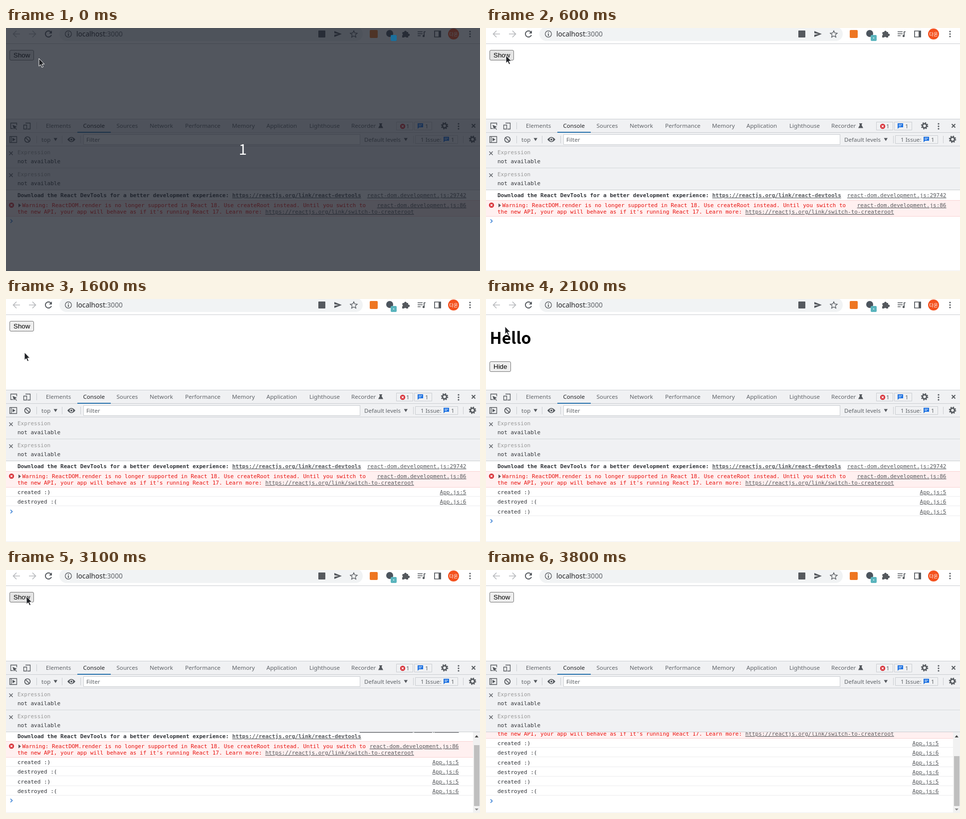
These frames come from a looping animation (950 px wide and 487 px high, 4100 ms). An HTML page:

```html
<!DOCTYPE html>
<html lang="en">
<meta charset="utf-8">
<title>Mount and unmount demo</title>
<style>
  html, body { margin: 0; width: 100%; height: 100%; overflow: hidden; background: #fff; }
  svg { display: block; width: 950px; height: 487px; }
  text { white-space: pre; }
  .ui { font: 11.6px "Noto Sans", sans-serif; fill: #5f6368; }
  .mono { font: 11px "DejaVu Sans Mono", monospace; fill: #303338; }
  .link { text-decoration: underline; fill: #55585c; }
  .end { text-anchor: end; }
  .red { fill: #e8120e; }
  .bold { font-weight: bold; }
  .dark { fill: #202124; }
  .icon { fill: none; stroke: #55595e; stroke-width: 1.7; }
  .solid { fill: #55595e; }
  .thin { stroke-width: 1.3; }
  .rule { stroke: #cacdd1; fill: none; }
  .cjk { font-family: "Noto Sans CJK KR", "Noto Sans CJK JP", "Noto Sans CJK", sans-serif; }
</style>
<svg viewBox="0 0 950 487">
  <defs>
    <g id="gear" class="icon">
      <circle r="4.1" stroke-width="2.8"/>
      <circle r="6.2" stroke-width="2.2" stroke-dasharray="2.435"/>
    </g>
    <g id="bubble">
      <path d="M0 0H11V8H3L0 11Z" fill="#1a6fe0"/>
      <path d="M2 2.8H9M2 5.3H7" stroke="#fff"/>
    </g>
    <g id="dots" class="solid"><circle cy="-5" r="1.6"/><circle r="1.6"/><circle cy="5" r="1.6"/></g>
    <path id="cross" d="M-3.5-3.5L3.5 3.5M3.5-3.5L-3.5 3.5"/>
    <g id="error">
      <circle r="5.2" fill="#d8343b"/>
      <path d="M-2-2L2 2M2-2L-2 2" stroke="#fff" stroke-width="1.3"/>
    </g>
    <clipPath id="list"><rect y="324" width="950" height="163"/></clipPath>
  </defs>

  <!-- Browser bar -->
  <rect x="107" y="-2" width="608" height="28" rx="14" fill="#f1f3f4"/>
  <path class="rule" d="M0 31.5H950" stroke="#dadce0"/>
  <g class="icon">
    <path d="M28 12H15M21 5.5L14.5 12L21 18.5M46 12H59M53 5.5L59.5 12L53 18.5" stroke="#b9bbbe"/>
    <path d="M90 8A6.2 6.2 0 1 0 91 14" stroke-width="2"/>
    <circle cx="125" cy="12" r="6.3" class="thin"/>
    <path d="M125 11V16M125 8V9.6"/>
    <path d="M697 5.5L699 10L704 10.5L700.2 13.8L701.3 18.5L697 16L692.7 18.5L693.8 13.8L690 10.5L695 10Z" class="thin"/>
    <path d="M825 7.5H835M825 11.5H835M825 15.5H831M838 16V7.5H841"/>
    <path d="M859 6H871V18H859Z"/>
  </g>
  <g class="solid">
    <path d="M92 5V11H86Z"/>
    <rect x="626" y="5" width="14" height="14" rx="1"/>
    <path d="M658 6L673 12L658 18V13.5L667 12L658 10.5Z"/>
    <path d="M795 8H798A2.4 2.4 0 1 1 803 8H806V11.5A2.4 2.4 0 1 1 806 16V19H802A2.2 2.2 0 0 0 798 19H794V15A2.2 2.2 0 0 0 794 11Z"/>
    <circle cx="837" cy="16" r="2.2"/>
    <path d="M867 6H872V18H867Z"/>
  </g>
  <rect x="729" y="4" width="16" height="16" rx="2" fill="#ee7623"/>
  <circle cx="769" cy="11" r="7" fill="#4c555e"/>
  <rect x="771" y="14" width="12" height="12" rx="2" fill="#5ab4bd"/>
  <circle cx="777" cy="20" r="1" fill="#fff"/>
  <circle cx="897" cy="12" r="11" fill="#f4511e"/>
  <text class="cjk" x="897" y="15.5" font-size="9.5" text-anchor="middle" fill="#fff">다온</text>
  <use href="#dots" x="930" y="12"/>
  <text class="ui dark" x="141" y="17" style="font-size:13.7px">localhost<tspan fill="#5f6368">:3000</tspan></text>

  <!-- Page -->
  <text id="hello" class="cjk" x="7.5" y="90" font-size="32" font-weight="bold">Hello</text>
  <g id="button">
    <rect id="face" x="7.5" y=".5" height="20" rx="2.5" stroke="#767676"/>
    <text id="label" x="15" y="15" font-family="Liberation Sans, Arial, sans-serif" font-size="13.33"></text>
  </g>

  <!-- Panel tabs and toolbar -->
  <rect y="182" width="950" height="142" fill="#f0f1f3"/>
  <path class="rule" d="M0 182.5H950M0 209.5H950M0 236.5H950M61.5 189V203M61.5 216V231M112.5 216V231M149.5 216V231M816.5 216V231M916.5 216V231"/>
  <path class="rule" d="M0 280.5H950" stroke-opacity=".7"/>
  <path d="M143 209H210" stroke="#2a73ad" stroke-width="2"/>
  <g class="icon thin">
    <path d="M14 201.5H9.5V190.5H21.5V195"/>
    <path d="M39 190.5H48.5V202.5H43M35.5 194.5H41.5V202.5H35.5Z"/>
    <path d="M7.5 217.5H21.5V229.5H7.5ZM10.5 218V229"/>
    <circle cx="43" cy="223.5" r="5.5" stroke-width="1.7"/>
    <path d="M39 219.5L47 227.5" stroke-width="1.7"/>
    <use href="#cross" x="937" y="196" stroke-width="1.8"/>
    <use href="#cross" x="10" y="251"/>
    <use href="#cross" x="10" y="295"/>
  </g>
  <g class="solid">
    <path d="M13 194L22 198L18.5 199.5L22 203L21 204L17.5 200.5L16 203.5Z"/>
    <path d="M13 220L19 223.5L13 227Z"/>
    <path d="M748 191H754V192.5H753V195L756 200.5H746L749 195V192.5H748Z"/>
    <path d="M95.500 220.500H103L99.250 226.500ZM797.500 220.500H805L801.250 226.500Z"/>
    <path d="M123 223.500Q131 213.500 139 223.500Q131 233.500 123 223.500Z"/>
  </g>
  <circle cx="131" cy="223.5" r="2.7" fill="#55595e" stroke="#f0f1f3" stroke-width="1.5"/>
  <rect class="rule" x="155.500" y="213.500" width="554" height="20" style="fill:#fff"/>
  <path class="rule" d="M782.5 188.500H815.5V204.500H782.5ZM818.500 188.500H853.500V204.500H818.500ZM820.500 215.500H905.500V231.500H820.500Z"/>
  <use href="#error" x="795" y="197"/>
  <use href="#bubble" x="825" y="191"/>
  <use href="#bubble" x="877" y="218"/>
  <use href="#gear" x="879" y="196"/>
  <use href="#gear" x="935" y="223"/>
  <use href="#dots" x="907" y="197"/>
  <g class="ui">
    <text x="80" y="200">Elements</text>
    <text x="154.500" y="200" class="dark">Console</text>
    <text x="221.500" y="200">Sources</text>
    <text x="288" y="200">Network</text>
    <text x="359" y="200">Performance</text>
    <text x="453" y="200">Memory</text>
    <text x="522" y="200">Application</text>
    <text x="608" y="200">Lighthouse</text>
    <text x="692" y="200">Recorder</text>
    <text x="802" y="201">1</text>
    <text x="840" y="201">1</text>
    <text x="71" y="228">top</text>
    <text x="161" y="228">Filter</text>
    <text x="718" y="228">Default levels</text>
    <text x="831" y="228">1 Issue:</text>
    <text x="892" y="228">1</text>
  </g>
  <g class="mono">
    <text x="23" y="253" fill="#999">Expression</text>
    <text x="23" y="271">not available</text>
    <text x="23" y="297" fill="#999">Expression</text>
    <text x="23" y="315">not available</text>
  </g>

  <!-- Console messages -->
  <g clip-path="url(#list)">
    <g id="messages" class="mono">
      <text x="23" y="339" class="bold">Download the React DevTools for a better development experience: <tspan class="link">https://reactjs.org/link/react-devtools</tspan></text>
      <text id="first" class="link end source" y="339">react-dom.development.js:29742</text>
      <rect y="345" width="950" height="32" fill="#fff0f0"/>
      <path d="M0 345.500H950M0 377.500H950" stroke="#f8d3d3"/>
      <use href="#error" x="11" y="355"/>
      <path class="solid" d="M25 351.500L30 355.500L25 359.500Z"/>
      <text x="32.500" y="359" class="red">Warning: ReactDOM.render is no longer supported in React 18. Use createRoot instead. Until you switch to</text>
      <text x="23" y="372" class="red">the new API, your app will behave as if it's running React 17. Learn more: <tspan class="link">https://reactjs.org/link/switch-to-createroot</tspan></text>
      <text class="link end source" y="359">react-dom.development.js:86</text>
      <g id="logs"></g>
      <path id="prompt" d="M9 -3.500L12.500 0L9 3.500" fill="none" stroke="#3b82d6" stroke-width="1.700"/>
    </g>
  </g>
  <path d="M0 486.500H950" stroke="#eeeff0"/>
  <path class="rule" d="M0 324.500H950"/>
  <g id="scrollbar">
    <rect x="936" y="325" width="14" height="162" fill="#f1f1f1"/>
    <path d="M939.500 335.500H947L943.250 331Z" fill="#404040"/>
    <path d="M939.500 478H947L943.250 482Z" fill="#8c8c8c"/>
    <rect id="thumb" x="938" width="11" fill="#bfbfbf"/>
  </g>

  <!-- Countdown -->
  <g id="countdown">
    <rect width="950" height="487" fill="#181e28" fill-opacity=".75"/>
    <rect x="771" y="14" width="12" height="12" rx="2" fill="#1a6f9c"/>
    <text class="cjk" x="474.500" y="254" font-size="29" text-anchor="middle" fill="#fff">1</text>
  </g>
  <path id="cursor" d="M0 0V15.500L3.500 12.300L6 18L8.600 16.800L6.100 11.300H10.800Z" fill="#1e2024" stroke="#fff"/>
</svg>
<script>
  const LOOP = 4100, STEP = 100, ROW = 19.25;
  const start = performance.now();
  const $ = id => document.getElementById(id);
  const show = (id, on) => $(id).style.display = on ? '' : 'none';

  // All times below count steps of 100 ms.
  const toggles = [7, 15, 21, 26, 32, 36];
  const logTimes = [7, 15, 21, 27, 32, 36];
  const cursorPath = [
    [0, 66, 61], [1, 67, 62], [3, 55, 59], [6, 40, 55], [7, 40, 56], [11, 51, 124],
    [13, 38, 134], [15, 37, 133], [18, 38, 55], [21, 38, 55], [22, 30, 112], [23, 30, 112],
    [24, 33, 142], [25, 33, 142], [26, 35, 138], [27, 36, 134], [31, 41, 53], [32, 40, 58],
    [34, 37, 133], [35, 37, 133], [37, 12, 150]
  ];

  const passed = (times, step) => times.filter(t => t <= step).length;

  function cursorAt(step) {
    const next = cursorPath.findIndex(p => p[0] >= step);
    const b = cursorPath[next], a = cursorPath[Math.max(0, next - 1)];
    const k = b === a ? 0 : (step - a[0]) / (b[0] - a[0]);
    return [1, 2].map(i => Math.round(a[i] + (b[i] - a[i]) * k));
  }

  $('logs').innerHTML = logTimes.map((_, i) => {
    const y = Math.round(391 + ROW * i), odd = i % 2;
    return `<g><text x="23" y="${y}">${odd ? 'destroyed :(' : 'created :)'}</text>
      <text class="link end source" y="${y}">App.js:${odd ? 6 : 5}</text>
      <path d="M0 ${y + 4.5}H950" stroke="#ececee"/></g>`;
  }).join('');

  function drawPage(step, x, y) {
    const open = passed(toggles, step) % 2 === 1;
    const top = open ? 125 : 44, width = open ? 42 : 48;
    const hover = x >= 7 && x <= 8 + width && y >= top && y <= top + 21;
    const pressed = step === 19 || step === 20;
    show('hello', open);
    $('label').textContent = open ? 'Hide' : 'Show';
    $('button').setAttribute('transform', `translate(0 ${top})`);
    $('face').setAttribute('width', width);
    $('face').setAttribute('fill', pressed ? '#f5f5f5' : hover ? '#e5e5e5' : '#efefef');
  }

  function drawConsole(count) {
    const scrolled = count > 3;
    const offset = scrolled ? Math.round(1.6 + 19.2 * (count - 4)) : 0;
    $('messages').setAttribute('transform', `translate(0 ${-offset})`);
    [...$('logs').children].forEach((row, i) => row.style.display = i < count ? '' : 'none');
    document.querySelectorAll('.source').forEach(el => el.setAttribute('x', scrolled ? 907.5 : 922.5));
    $('first').setAttribute('y', scrolled ? 326 : 339);
    $('prompt').setAttribute('transform', `translate(0 ${Math.round(387 + ROW * count)})`);
    show('scrollbar', scrolled);
    const top = 351 + 11 * Math.max(0, count - 4);
    $('thumb').setAttribute('y', top);
    $('thumb').setAttribute('height', 473 - top);
  }

  function draw() {
    const step = Math.floor((performance.now() - start) % LOOP / STEP);
    const [x, y] = cursorAt(Math.min(step, 37));
    drawPage(step, step < 38 ? x : -1, y);
    drawConsole(passed(logTimes, step));
    show('countdown', step === 0);
    show('cursor', step < 38);
    $('cursor').setAttribute('transform', `translate(${x} ${y})`);
    requestAnimationFrame(draw);
  }
  draw();
</script>
</html>
```
